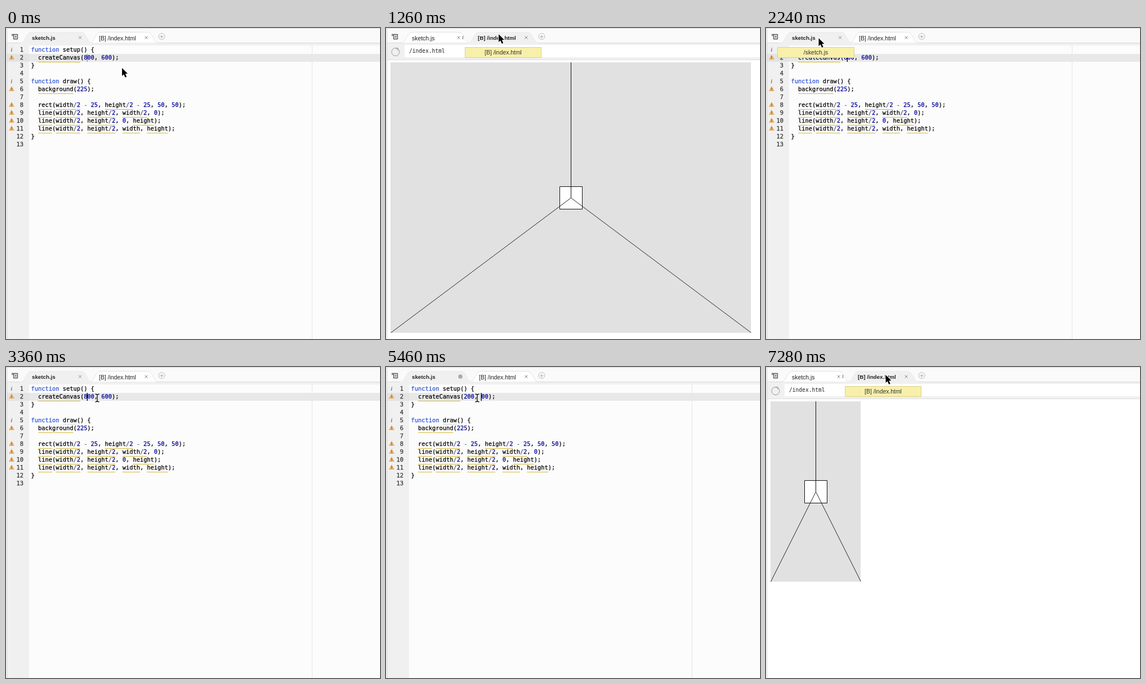
Write an HTML page with a canvas that moves like this. It is 664 px wide and 552 px high and loops after 8000 ms.

```html
<!DOCTYPE html>
<html lang="en">
<head>
<meta charset="utf-8">
<title>Code editor</title>
<style>
html, body { margin: 0; width: 100%; height: 100%; overflow: hidden; background: #fff; }
canvas { display: block; }
</style>
</head>
<body>
<canvas id="stage" width="664" height="552"></canvas>
<script>
const g = document.getElementById('stage').getContext('2d');
const LOOP = 8000, STEP = 140;
const CH = 6.235, LEFT = 44.6, ROW = 14;
const MONO = '"DejaVu Sans Mono", monospace';
const SANS = '"Liberation Sans", Arial, sans-serif';
const CODE = '10.36px ' + MONO, PLAIN = '10.4px ' + SANS, BOLD = 'bold 9.75px ' + SANS;
const BAR = '#f0f0f0', EDGE = '#d9d9d9';

// Tracks: [time, values...]
const mouse = [
  [0, 206, 71], [420, 204, 64], [1120, 201, 15], [1260, 200, 11], [1540, 200, 11],
  [2100, 95, 17], [2240, 93.5, 18], [2660, 162, 55], [6160, 162, 55],
  [6580, 112.5, 27], [7000, 204, 18], [7140, 204, 18], [7280, 212.5, 14]
];
const blink = [
  [0, .35], [140, 0], [420, 0], [700, 1], [840, 1], [1120, 0], [1960, 0], [2100, 1],
  [2660, 1], [2940, 0], [3080, 0], [3360, 1], [3500, 1], [3780, 0], [4060, 0],
  [4200, 1], [5880, 1], [6020, 0]
];
// Edits: [time, width, height, caret column]
const edits = [
  [0, '800', '600', 16], [4200, '00', '600', 15], [4340, '200', '600', 16],
  [4480, '200', '600', 18], [4620, '200', '600', 19], [4900, '200', '600', 21],
  [5460, '200', '00', 20], [5740, '200', '400', 21]
];

const within = (t, a, b) => t >= a && t < b;

function at(track, t) {
  const i = track.findLastIndex(k => k[0] <= t);
  const a = track[i], b = track[i + 1] || a;
  const f = a === b ? 0 : (t - a[0]) / (b[0] - a[0]);
  return a.slice(1).map((v, n) => v + (b[n + 1] - v) * f);
}

function box(x, y, w, h, color) {
  g.fillStyle = color;
  g.fillRect(x, y, w, h);
}

function text(s, x, y, font, color = '#222', align = 'left') {
  g.font = font;
  g.textAlign = align;
  g.fillStyle = color;
  g.fillText(s, x, y);
}

// Code glyphs get a hairline outline for a slightly heavier weight.
function code(s, x, y, color, align) {
  text(s, x, y, CODE, color, align);
  g.strokeStyle = color;
  g.lineWidth = .25;
  g.strokeText(s, x, y);
}

function line(points, color, width = 1) {
  g.beginPath();
  points.forEach(([x, y]) => g.lineTo(x, y));
  g.strokeStyle = color;
  g.lineWidth = width;
  g.stroke();
}

function disc(x, y, r, fill, stroke) {
  g.beginPath();
  g.arc(x, y, r, 0, 7);
  if (fill) { g.fillStyle = fill; g.fill(); }
  if (stroke) { g.strokeStyle = stroke; g.lineWidth = 1; g.stroke(); }
}

function cross(x, y) {
  line([[x - 2.5, y - 2.5], [x + 2.5, y + 2.5]], '#888');
  line([[x - 2.5, y + 2.5], [x + 2.5, y - 2.5]], '#888');
}

function tab(x0, x1, active) {
  const top = 7.5, base = 26.5;
  g.beginPath();
  g.moveTo(x0, base);
  g.bezierCurveTo(x0 + 10, base, x0 + 9, top, x0 + 20, top);
  g.lineTo(x1 - 20, top);
  g.bezierCurveTo(x1 - 9, top, x1 - 10, base, x1, base);
  g.fillStyle = active ? BAR : '#fff';
  g.fill();
  g.strokeStyle = active ? '#ebebeb' : '#e2e2e2';
  g.lineWidth = 1;
  g.stroke();
  if (active) box(x0 + 1, 26, x1 - x0 - 2, 2, BAR);
}

function tabBar(t, preview) {
  box(0, 0, 664, 27, '#fafafa');
  box(0, 0, 664, 1, EDGE);
  box(2, 26, 662, 1, EDGE);
  box(2, 27, 662, 5, BAR);
  if (preview) { tab(27, 149, false); tab(145, 271, true); }
  else { tab(148, 271, false); tab(25, 153, true); }

  line([[10, 11.5], [20.5, 11.5], [20.5, 19.5], [13.5, 19.5], [13.5, 12]], '#555', 1.3);
  line([[10, 13.5], [13, 13.5]], '#555');
  line([[15, 14.5], [19, 14.5]], '#555');
  line([[15, 16.5], [19, 16.5]], '#555');
  disc(276.5, 15, 5.5, null, '#bbb');
  line([[273.5, 15.5], [279.5, 15.5]], '#aaa');
  line([[276.5, 12.5], [276.5, 18.5]], '#aaa');

  text('sketch.js', 46, preview ? 22 : 21, preview ? PLAIN : BOLD);
  text('[B] /index.html', preview ? 163 : 165, preview ? 21 : 22, preview ? BOLD : PLAIN);
  cross(249, 17);
  if (preview) {
    cross(129, 17);
    line([[136.5, 14], [136.5, 20]], '#666');
  } else if (t < 4200) cross(131.5, 17);
  else if (t < 6440) disc(132, 17, 3.8, '#aaa');
  else disc(131, 16.5, 3.3, '#c9ad4b');
}

function tokenColor(s) {
  if (s === 'function') return '#2a50d8';
  if (/^\d/.test(s)) return '#00009c';
  return /[-\/]/.test(s) ? '#46546c' : '#000';
}

function sign(row, y) {
  if (row === 0 || row === 4) {
    text('i', 10, y + 4, 'italic bold 10px "Liberation Serif", serif', '#777', 'center');
  } else if ([1, 5, 7, 8, 9, 10].includes(row)) {
    g.beginPath();
    g.moveTo(10, y - 5);
    g.lineTo(15, y + 4);
    g.lineTo(5, y + 4);
    g.closePath();
    g.fillStyle = '#e8b06a';
    g.fill();
    box(9.5, y - 2, 1, 3, '#7a4a1e');
    box(9.5, y + 2, 1, 1, '#7a4a1e');
  }
}

function editor(t) {
  const [, w, h, col] = edits.findLast(e => e[0] <= t);
  const rows = [
    'function setup() {', `  createCanvas(${w}, ${h});`, '}', '',
    'function draw() {', '  background(225);', '',
    '  rect(width/2 - 25, height/2 - 25, 50, 50);',
    '  line(width/2, height/2, width/2, 0);',
    '  line(width/2, height/2, 0, height);',
    '  line(width/2, height/2, width, height);', '}', ''
  ];
  box(2, 31, 662, 521, '#fcfcfc');
  box(2, 31, 39, 521, BAR);
  box(2, 46, 39, 14, '#e3e3e3');
  box(543, 31, 1, 521, '#e5e5e5');
  box(41, 46, 623, 14, '#e8e8e8');

  rows.forEach((s, i) => {
    const mid = 38 + i * ROW;
    sign(i, mid);
    code(i + 1, 31, mid + 4, '#333', 'right');
    for (const m of s.matchAll(/createCanvas|background|rect|line|(width|height)(\/2)?/g))
      box(LEFT + m.index * CH, mid + 8, m[0].length * CH, 1, '#d6b93a');
    for (const m of s.matchAll(/\d+|\w+|\S/g))
      code(m[0], LEFT + m.index * CH, mid + 4, tokenColor(m[0]));
  });
  box(LEFT + 9 * CH, 101, 4 * CH, 1, '#c9d3e0');

  g.globalAlpha = at(blink, t)[0];
  box(LEFT + col * CH - .8, 46, 1.4, 14, '#000');
  g.globalAlpha = 1;
}

function sketch(w, h) {
  const x = 8, y = 61, cx = x + w / 2 + .5, cy = y + h / 2 + .5, ink = '#111';
  g.save();
  g.beginPath();
  g.rect(x, y, w + .5, h + .5);
  g.clip();
  box(x, y, w, h, '#e1e1e1');
  box(cx - 20, cy - 20, 40, 40, '#fff');
  g.strokeStyle = ink;
  g.lineWidth = 1;
  g.strokeRect(cx - 20, cy - 20, 40, 40);
  line([[cx, cy], [cx, y]], ink);
  line([[x + .5, y + h], [cx, cy], [x + w + .5, y + h]], ink, .9);
  g.restore();
}

function page(t) {
  box(2, 27, 662, 30, BAR);
  box(33, 30, 631, 22, '#fff');
  box(2, 56, 662, 1, '#dedede');
  box(2, 57, 662, 495, '#fff');
  disc(17, 42.5, 7, null, '#999');
  line([[17, 36], [21, 36], [21, 40]], '#888');
  text('/index.html', 41, 44, '9.6px ' + MONO);
  if (t < 7000) sketch(640, 480);
  else if (t >= 7280) sketch(160, 320);
}

function tooltip(label, x, w, y = 34) {
  box(x, y, w, 19, '#ddd18a');
  box(x + 1, y + 1, w - 2, 17, '#f8f0aa');
  text(label, x + w / 2, y + 13, PLAIN, '#333', 'center');
}

function arrow(x, y) {
  const shape = [[0, 0], [0, 14], [3.2, 11.2], [5.6, 16.8], [8.2, 15.7], [5.8, 10.3], [10, 10]];
  g.beginPath();
  shape.forEach(([a, b]) => g.lineTo(x + a, y + b));
  g.closePath();
  g.lineJoin = 'round';
  g.strokeStyle = '#fff';
  g.lineWidth = 2;
  g.stroke();
  g.fillStyle = '#000';
  g.fill();
}

function beam(x, y) {
  for (const [color, width] of [['#fff', 3], ['#111', 1.4]]) {
    line([[x, y - 6], [x, y + 6]], color, width);
    for (const s of [-1, 1])
      line([[x - 3.5, y + s * 7], [x, y + s * 6], [x + 3.5, y + s * 7]], color, width);
  }
}

function draw(now) {
  const t = Math.floor(now % LOOP / STEP + 1e-6) * STEP;
  const preview = within(t, 1260, 2100) || t >= 7000;
  box(0, 0, 664, 552, '#fff');
  tabBar(t, preview);
  preview ? page(t) : editor(t);
  box(0, 1, 1, 551, '#fff');
  box(1, 1, 1, 551, '#d2d2d2');

  if (within(t, 1260, 1820) || t >= 7280) tooltip('[B] /index.html', 140, 136);
  else if (within(t, 7000, 7280)) tooltip('[B] /index.html', 140, 142, 36);
  else if (within(t, 2100, 2520)) tooltip('/sketch.js', 20, 137);
  else if (within(t, 6580, 6860)) tooltip('/sketch.js', 20, 140, 36);

  const [x, y] = at(mouse, t);
  within(t, 2520, 6440) ? beam(x, y) : arrow(x, y);
}

let start;
function tick(now) {
  start ??= now;
  draw(now - start);
  requestAnimationFrame(tick);
}
draw(0);
requestAnimationFrame(tick);
</script>
</body>
</html>
```
